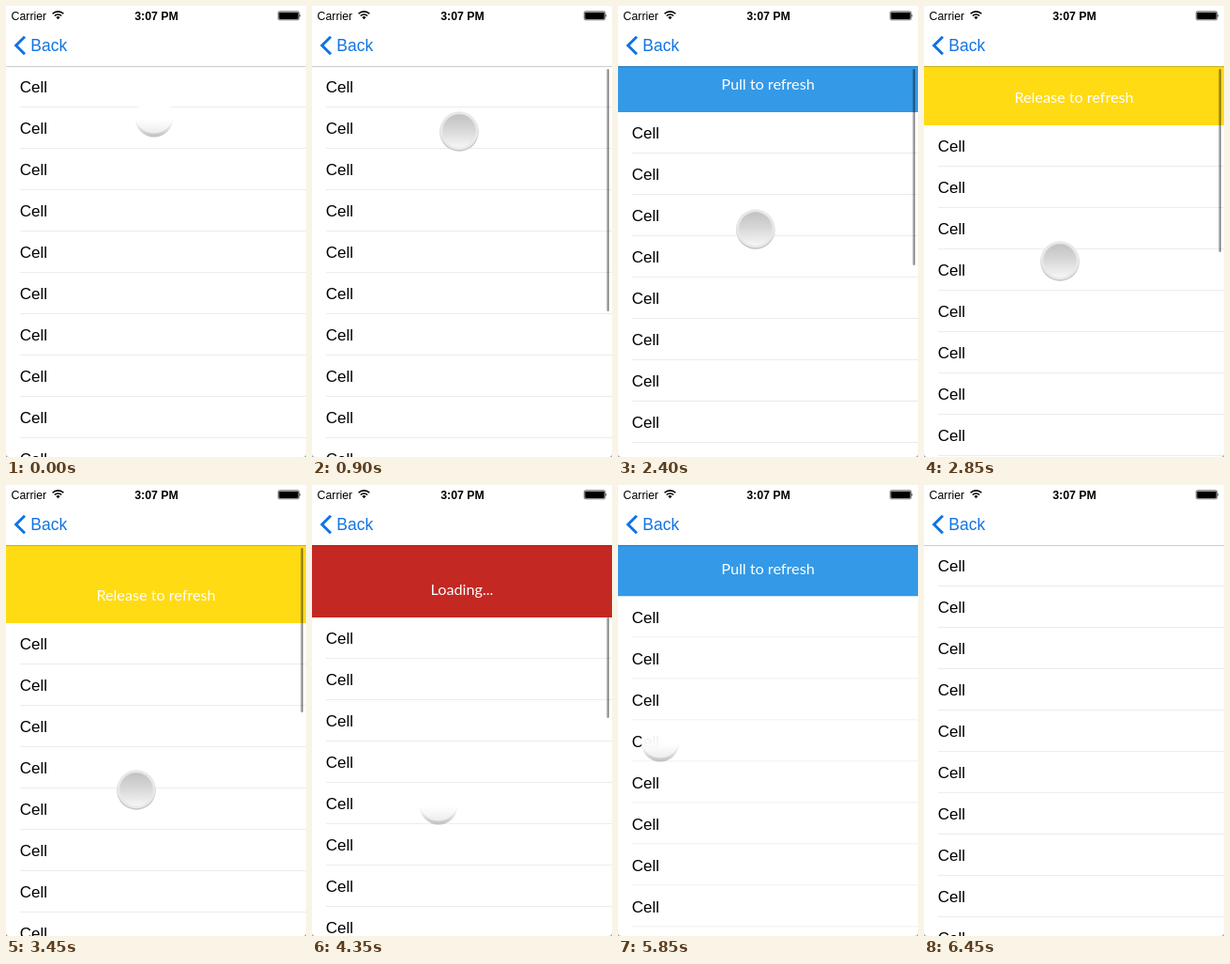
An HTML page for the animation above (7500 ms loop, 320 px wide and 480 px high).

```html
<!DOCTYPE html>
<html lang="en">
<head>
<meta charset="utf-8">
<title>Pull to refresh</title>
<style>
  html, body { margin: 0; height: 100%; overflow: hidden; background: #fff; }
  svg { display: block; width: 100%; height: 100%; }
  text { font-family: "Liberation Sans", Arial, sans-serif; }
  #label { font: 16.2px Lato, "Open Sans", sans-serif; fill: #fff; text-anchor: middle; }
</style>
</head>
<body>
<svg viewBox="0 0 320 480">
  <defs>
    <linearGradient id="press" x1="0" y1="0" x2="0" y2="1">
      <stop offset="0" stop-color="#c2c2c2"/>
      <stop offset=".45" stop-color="#d6d6d6"/>
      <stop offset="1" stop-color="#f6f6f6"/>
    </linearGradient>
    <linearGradient id="rim" x1="0" y1="0" x2="0" y2="1">
      <stop offset=".45" stop-color="#fff" stop-opacity="0"/>
      <stop offset=".75" stop-color="#dedede" stop-opacity=".8"/>
      <stop offset="1" stop-color="#bdbdbd"/>
    </linearGradient>
    <linearGradient id="bowl" x1="0" y1="0" x2="0" y2="1">
      <stop offset=".5" stop-color="#fff" stop-opacity="0"/>
      <stop offset="1" stop-color="#ececec"/>
    </linearGradient>
  </defs>

  <rect width="320" height="480" fill="#fff"/>
  <rect id="header" y="64" width="320"/>
  <text id="label" x="160"></text>
  <g id="rows" font-size="17"></g>
  <rect id="bar" x="314.5" width="2.5" rx="1.25" fill="#000"/>

  <rect width="320" height="64" fill="#fff"/>
  <rect y="64" width="320" height="1" fill="#000" opacity=".2"/>
  <path d="M20 32.8 10.7 42 20 51.2" fill="none" stroke="#1074e4" stroke-width="3"/>
  <text x="26.3" y="48" font-size="17.5" fill="#1074e4">Back</text>
  <text x="5.6" y="14.5" font-size="12.3">Carrier</text>
  <text x="160.5" y="14.5" font-size="12.3" font-weight="700" text-anchor="middle">3:07 PM</text>
  <g fill="none" stroke="#000" stroke-width="1.6">
    <path d="M49.6 8.3a8.3 8.3 0 0 1 11.8 0M51.8 10.5a5.2 5.2 0 0 1 7.4 0"/>
    <path d="M53.4 12 55.5 14.2 57.6 12a3 3 0 0 0-4.2 0z" fill="#000" stroke="none"/>
  </g>
  <rect x="290.3" y="5.8" width="22.4" height="9" rx="1.5" fill="none" stroke="#000" stroke-width=".6"/>
  <rect x="291.2" y="6.7" width="20.6" height="7.2" rx=".8"/>
  <path d="M313.4 8.6q1.6 1.7 0 3.4z"/>

  <g id="touch">
    <g id="up">
      <circle r="20.5" fill="#fff" opacity=".75"/>
      <circle cy="1" r="20.5" fill="url(#rim)"/>
      <circle cy="-2" r="19.5" fill="#fff" opacity=".75"/>
      <circle cy="-1" r="18" fill="url(#bowl)"/>
    </g>
    <g id="down">
      <circle cy="1" r="20.7" fill="#c4c4c4"/>
      <circle cy="-.3" r="20.5" fill="#e8e8e8"/>
      <circle r="17.8" fill="url(#press)"/>
    </g>
  </g>
  <path d="M0 476.5Q0 480 3.5 480H0zM320 476.5Q320 480 316.5 480H320z" fill="#999"/>
</svg>
<script>
const LOOP = 7500, STEP = 150;
const PRESS = 450, DRAG = 750, RELEASE = 4350, CLOSE = 5794;
const REST = 60, VIEW = 416;

// Finger path: time, x, y
const path = [
  [0, 158, 118], [600, 158, 118], [900, 157, 133], [1200, 153, 152],
  [1350, 153, 152], [1800, 149, 192], [2850, 145, 271], [3450, 139, 324],
  [3600, 137, 338], [3750, 137, 338], [4050, 135, 340], [5250, 135, 340],
  [5850, 45, 273], [6300, -13, 239], [6450, -40, 225], [LOOP, -40, 225]
];

const $ = id => document.getElementById(id);
const clamp = v => Math.max(0, Math.min(1, v));
const set = (id, attrs) => {
  for (const k in attrs) $(id).setAttribute(k, attrs[k]);
};

$("rows").innerHTML = Array.from({ length: 10 }, (_, i) => `
  <rect y="${64 + i * 44}" width="320" height="44" fill="#fff"/>
  <text x="14.8" y="${92 + i * 44}">Cell</text>
  <rect x="15" y="${107 + i * 44}" width="305" height="1" fill="#ececec"/>`).join("");

function finger(t) {
  const i = path.findIndex(p => p[0] > t);
  const [t0, x0, y0] = path[i - 1], [t1, x1, y1] = path[i];
  const k = (t - t0) / (t1 - t0);
  return [x0 + (x1 - x0) * k, y0 + (y1 - y0) * k];
}

function pull(t, y) {
  if (t < RELEASE) {
    // Rubber band resistance
    const d = Math.max(0, y - 136) * 0.55;
    return d / (1 + d / VIEW);
  }
  if (t < CLOSE) return REST + 17 * Math.exp((RELEASE - t) / 130);
  const p = clamp((t - CLOSE) / 300);
  return REST * (1 - p * p * (3 - 2 * p));
}

function state(t, offset) {
  if (t >= RELEASE && t < CLOSE) return ["#c42823", "Loading..."];
  if (t < RELEASE && offset >= REST) return ["#ffdb14", "Release to refresh"];
  return ["#3499e7", "Pull to refresh"];
}

function draw(t) {
  const [x, y] = finger(t);
  const offset = Math.round(pull(t, y) * 2) / 2;
  const [color, message] = state(t, offset);
  const pressed = t >= PRESS && t < RELEASE;

  set("header", { height: offset, fill: color });
  set("label", { y: 40 + offset });
  $("label").textContent = message;
  set("rows", { transform: `translate(0 ${offset})` });

  const top = t < RELEASE ? 67 : 64 + offset;
  const fade = t < DRAG ? 0 : 1 - clamp((t - 4650) / 300);
  set("bar", { y: top, height: 325 - offset - top, opacity: 0.4 * fade });

  set("touch", { transform: `translate(${x} ${y})` });
  set("up", { visibility: pressed ? "hidden" : "visible" });
  set("down", { visibility: pressed ? "visible" : "hidden" });
}

// The screen refreshes once per STEP
const start = performance.now();
function tick() {
  const t = (performance.now() - start) % LOOP;
  draw(Math.floor(t / STEP) * STEP);
  requestAnimationFrame(tick);
}
tick();
</script>
</body>
</html>
```
